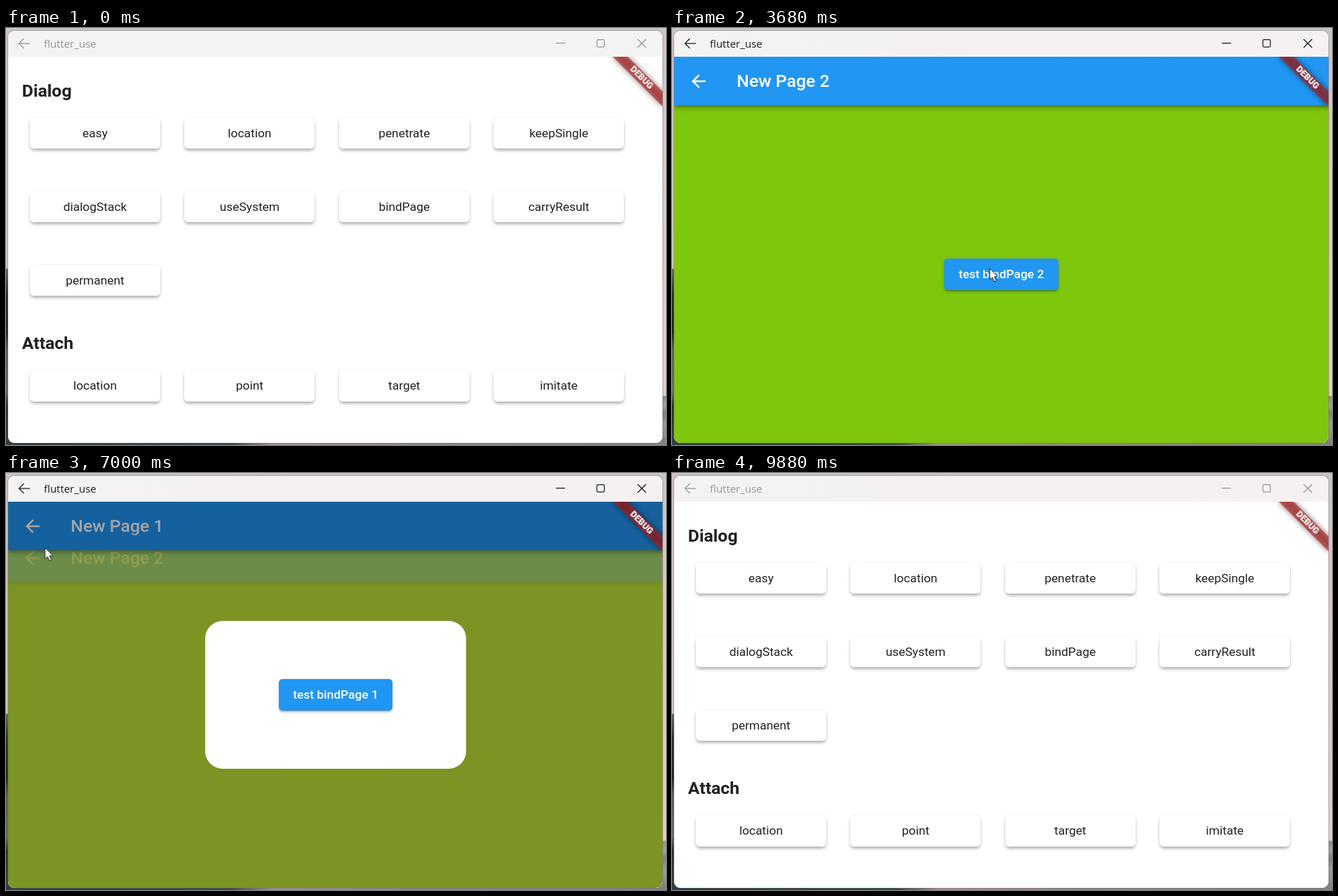
Write an HTML page that moves like this. It is 941 by 595 pixels and loops after 9.94 s.

```html
<!DOCTYPE html>
<html lang="en">
<head>
<meta charset="utf-8">
<title>flutter_use</title>
<style>
html, body { margin: 0; width: 100%; height: 100%; overflow: hidden; }
body { position: relative; font: 17.36px/1.172 Roboto, sans-serif; color: #212121; cursor: default; }
div, svg { position: absolute; box-sizing: border-box; }
.fill { inset: 0; }
.center { display: flex; align-items: center; justify-content: center; white-space: nowrap; }

.desktop { width: 941px; height: 595px; overflow: hidden; background: #c8c4c4; }
.left { left: 0; top: 4px; width: 14px; bottom: 0;
  background: linear-gradient(#cfc1c2, #d8c6c5 339px, #66676a 340px, #2a2d30 375px, #1f2225 430px, #5c5c5e 455px, #6a6a6b 515px, #2a2e31 535px, #343c3e); }
.right { right: 0; top: 4px; width: 14px; bottom: 0;
  background: linear-gradient(#cbc4c5, #dcc8c6 200px, #e2cdc8 520px, #8d8a8a 522px, #a5a2a2 535px, #7f7d7e 545px, #9b9999 560px, #858385); }
.bottom { left: 0; right: 0; bottom: 0; height: 10px;
  background: linear-gradient(90deg, #2f3c40, #39474b 320px, #a39291 380px, #8f8687 60%, #858183); }
.window { left: 3px; top: 4px; width: 933px; height: 588px; border-radius: 9px; overflow: hidden; background: #fff; }
.edge { left: 3px; top: 4px; width: 933px; height: 588px; border-radius: 9px; box-shadow: 0 0 0 1px rgba(110,105,105,.45); }
.titlebar { left: 0; top: 0; width: 100%; height: 37px; background: #f3f3f3; }
.mica { background: linear-gradient(90deg, #f3f3f4, #f5f0f1 45%, #f5f1f1); }
.caption { left: 51px; top: 0; height: 36px; line-height: 36px; font-family: "Open Sans", "Noto Sans", sans-serif; font-size: 15px; }
.view { left: 0; top: 37px; width: 933px; height: 551px; overflow: hidden; background: #fff; }

h2 { position: absolute; margin: 0; left: 19.8px; font-size: 24.8px; line-height: 30px; font-weight: 700; }
.card { width: 186px; height: 44.6px; border-radius: 6px; background: #fff; overflow: hidden; }
.lift { width: 186px; height: 44.6px; border-radius: 6px;
  box-shadow: 0 4px 4px -1px rgba(0,0,0,.22), 0 2px 5px rgba(0,0,0,.12), 0 0 2px rgba(0,0,0,.08); }
.bar { left: 0; top: 0; width: 100%; height: 69.4px; background: #2196f3; color: #fff;
  box-shadow: 0 2.5px 5px -1px rgba(0,0,0,.3), 0 5px 6px rgba(0,0,0,.13), 0 1px 12px rgba(0,0,0,.12); }
.bar .name { left: 89.3px; top: 0; line-height: 69.4px; font-size: 24.8px; font-weight: 500; white-space: nowrap; }
.halo { left: 0; top: 0; width: 76px; height: 69.4px; overflow: hidden; opacity: 0; }
.halo div { left: -5px; top: -5px; width: 80px; height: 80px; border-radius: 50%; background: #fff; }
.button { width: 162.6px; height: 44.6px; border-radius: 5px; background: #2196f3; color: #fff; font-weight: 500;
  box-shadow: 0 3px 1.5px -2px rgba(0,0,0,.2), 0 2.5px 2.5px rgba(0,0,0,.14), 0 1px 6px rgba(0,0,0,.12); }
.button .ink { border-radius: 5px; }
.ink { inset: 0; overflow: hidden; }
.ink div { width: 340px; height: 340px; margin: -170px; border-radius: 50%; opacity: 0; }
.mask { background: rgba(0,0,0,.353); opacity: 0; }
.box { left: 280.5px; top: 170px; width: 372px; height: 210.8px; border-radius: 25px; background: #fff; transform: scale(0); }

.banner { left: 933px; top: 0; width: 0; height: 0; transform: rotate(45deg); }
.banner div { left: -49.6px; top: 34.7px; width: 99.2px; height: 14.9px; }
.banner .shade { background: rgba(0,0,0,.5); filter: blur(4px); }
.banner .tape { background: rgba(183,28,28,.627); color: #fff; font-size: 12.65px; line-height: 1; font-weight: 900; }
</style>
</head>
<body>
<div class="desktop" id="desktop">
  <div class="left"></div><div class="right"></div><div class="bottom"></div>
  <div class="edge"></div>
  <div class="window">
    <div class="titlebar">
      <div class="fill mica" id="mica"></div>
      <div class="fill" id="chrome">
        <svg width="933" height="37" fill="none" stroke="currentColor" stroke-width="1.25">
          <path d="M31 18H16M22.5 11L15.5 18L22.5 25M781 17.5H794M897.5 12L909.5 24M909.5 12L897.5 24"/>
          <rect x="839.5" y="12.5" width="10.6" height="10.6" rx="1.5"/>
        </svg>
        <div class="caption">flutter_use</div>
      </div>
    </div>
    <div class="view" id="view"><div class="fill" id="home"></div></div>
  </div>
  <svg id="cursor" width="16" height="24" style="left:0;top:0;overflow:visible">
    <path d="M.3 .3V16.4L4 12.9L6.7 19L9.4 17.8L6.8 11.9H11.8Z" fill="#fff" stroke="#222" stroke-width="1" stroke-linejoin="round"/>
  </svg>
</div>
<script>
const LOOP = 9940;
const FADE = 300, ZOOM = 260;
const byId = id => document.getElementById(id);

function add(parent, cls, text = '', style = {}) {
  const el = document.createElement('div');
  el.className = cls;
  el.textContent = text;
  Object.assign(el.style, style);
  parent.append(el);
  return el;
}

// steps: [ms, value, easing to the next step]
function play(el, prop, steps, format = v => v) {
  const all = [[0, steps[0][1]], ...steps, [LOOP, steps[steps.length - 1][1]]];
  el.animate(
    all.map(([ms, v, easing = 'linear']) => ({ offset: ms / LOOP, [prop]: format(v), easing })),
    { duration: LOOP, iterations: Infinity });
}

const scale = v => `scale(${v})`;
const slide = v => `translateY(${v}px)`;

function ripple(host, x, y, at, color) {
  const ink = add(host, 'ink');
  const spot = add(ink, '', '', { left: x + 'px', top: y + 'px', background: color });
  play(spot, 'transform', [[at, .12, 'ease-out'], [at + 330, 1]], scale);
  play(spot, 'opacity', [[at, 0], [at + 50, 1], [at + 250, 1], [at + 480, 0]]);
}

// Home page
const home = byId('home');
const rows = [
  [86.7, 'easy location penetrate keepSingle'],
  [191.7, 'dialogStack useSystem bindPage carryResult'],
  [296.7, 'permanent'],
  [447.2, 'location point target imitate']
];
[['Dialog', 33.5], ['Attach', 394]].forEach(([text, top]) => {
  const h = document.createElement('h2');
  h.textContent = text;
  h.style.top = top + 'px';
  home.append(h);
});
for (const [top, names] of rows) {
  names.split(' ').forEach((name, i) => {
    const pos = { left: 31 + i * 220.4 + 'px', top: top + 'px' };
    add(home, 'lift', '', pos);
    const card = add(home, 'card center', name, pos);
    if (name === 'bindPage') ripple(card, 104, 32, 840, 'rgba(0,0,0,.1)');
  });
}

// Pages: colour, push, pop, button press
const pages = [
  ['rgb(210,239,70)', 1700, 7876, 2270],
  ['rgb(127,198,14)', 3210, 6830, 3930],
  ['rgb(26,54,126)', 4695, 5764, 0]
];
// Dialogs: open, hide, show again, close, button press
const dialogs = [
  [930, 1700, 7876, 8400, 1620],
  [2337, 3210, 6830, 7150, 3120],
  [4000, 4695, 5764, 6260, 4600]
];
const view = byId('view');
const ARROW = '<svg width="29.8" height="29.8" viewBox="0 0 24 24" style="left:20px;top:19.8px">' +
  '<path fill="#fff" d="M20 11H7.8L13.4 5.4 12 4 4 12 12 20 13.4 18.6 7.8 13H20Z"/></svg>';

function makeButton(host, n, left, top) {
  return add(host, 'button center', 'test bindPage ' + n, { left: left + 'px', top: top + 'px' });
}

pages.forEach(([color, push, pop, press], i) => {
  const n = i + 1;
  const page = add(view, 'fill', '', { background: color });
  const button = makeButton(page, n, 385.2, 288.2);
  if (press) ripple(button, 75, 30, press, 'rgba(255,255,255,.2)');
  const bar = add(page, 'bar');
  const halo = add(bar, 'halo');
  add(halo, '');
  bar.insertAdjacentHTML('beforeend', ARROW);
  add(bar, 'name', 'New Page ' + n);

  play(halo, 'opacity', [[pop - 260, 0], [pop - 200, .08], [pop - 90, .08], [pop, .25], [pop + 50, .25], [pop + 170, 0]]);
  play(page, 'opacity', [
    [push, 0, 'cubic-bezier(.42,0,1,1)'], [push + FADE, 1],
    [pop, 1, 'cubic-bezier(0,0,.58,1)'], [pop + FADE, 0]]);
  play(page, 'transform', [
    [push, 137.8, 'cubic-bezier(.4,0,.2,1)'], [push + FADE, 0],
    [pop, 0, 'cubic-bezier(.8,0,.6,1)'], [pop + FADE, 137.8]], slide);
});

dialogs.forEach(([open, hide, show, close, press], n) => {
  const steps = [
    [open, 0], [open + ZOOM, 1], [hide, 1], [hide, 0],
    [show, 0], [show, 1], [close, 1], [close + ZOOM, 0]];
  const mask = add(view, 'fill mask');
  const box = add(view, 'box');
  const button = makeButton(box, n, 104.7, 83.1);
  ripple(button, 75, 26, press, 'rgba(255,255,255,.2)');
  play(mask, 'opacity', steps);
  play(box, 'transform', steps, scale);
});

const banner = add(view, 'banner');
add(banner, 'shade');
add(banner, 'tape center', 'DEBUG');

// Window focus
play(byId('mica'), 'opacity', [[830, 0], [830, 1]]);
play(byId('chrome'), 'color', [[830, '#969696'], [830, '#1b1b1b'], [9880, '#1b1b1b'], [9880, '#969696']]);

// Pointer: ms, x, y, easing
const S = 'ease-in-out';
const path = [
  [150, 862, 600, 'cubic-bezier(.2,.3,.4,1)'], [610, 576, 265], [1060, 576, 265, S],
  [1360, 546, 316], [1420, 546, 316, S], [1600, 520, 321], [1720, 520, 321, S],
  [2200, 461, 360], [2500, 461, 360, S], [2870, 458, 316], [3280, 458, 316, S],
  [3800, 452, 346], [4080, 452, 346, S], [4450, 444, 319], [4900, 444, 319, S],
  [5560, 33, 82], [5800, 33, 82, S], [5950, 57, 99, 'ease-out'], [6150, 72, 122],
  [6320, 72, 122, S], [6640, 33, 82], [6880, 33, 82, S], [7080, 66, 118],
  [7220, 66, 118, S], [7660, 33, 82], [7930, 33, 82, S], [8270, 96, 160],
  [8460, 96, 160, 'cubic-bezier(.5,0,.8,.7)'], [9160, 594, 477], [9225, 800, 605]
];
play(byId('cursor'), 'transform', path.map(([ms, x, y, e]) => [ms, [x, y], e]),
  ([x, y]) => `translate(${x}px, ${y}px)`);
</script>
</body>
</html>
```
